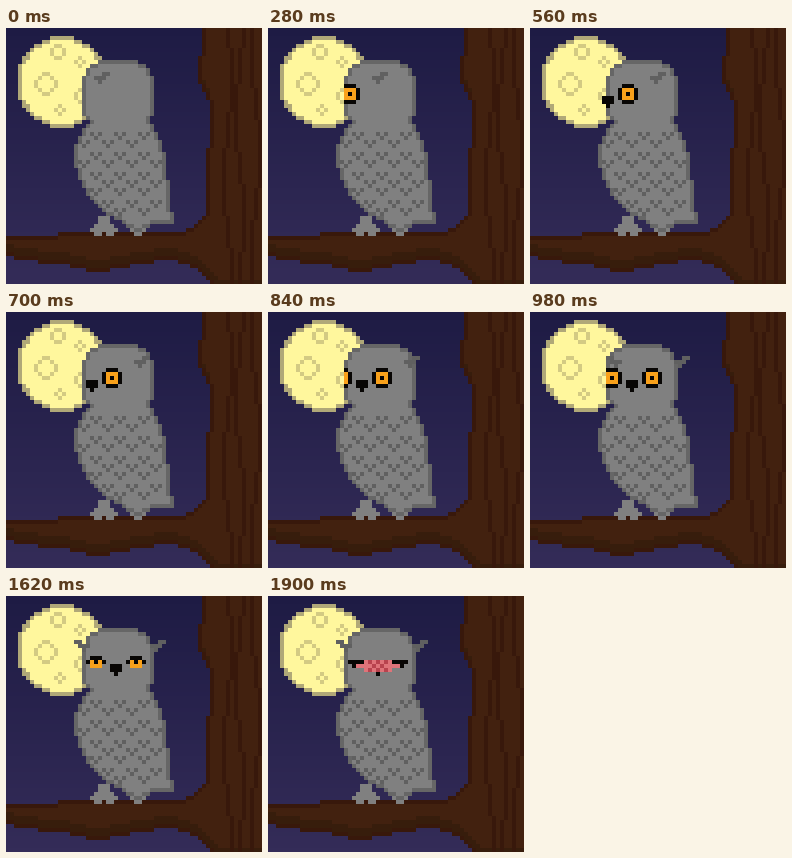
These frames come from a looping animation (256 by 256 pixels, 2900 ms). An HTML page with a canvas:

```html
<!DOCTYPE html>
<html lang="en">
<head>
<meta charset="utf-8">
<title>Night owl</title>
<style>
html, body { margin: 0; width: 100%; height: 100%; overflow: hidden; background: #25214f; }
canvas { display: block; width: 100vw; height: 100vh; image-rendering: pixelated; }
</style>
</head>
<body>
<canvas id="stage" width="64" height="64"></canvas>
<script>
const SIZE = 64, LOOP = 2900, STEP = 70, BLINK = 1620;
const ctx = document.getElementById('stage').getContext('2d');
const BARK = '#42210f', BARK_DARK = '#38180b', BARK_SHADE = '#371d0c';
const INK = { B: '#080604', O: '#f9a11b', G: '#808080', D: '#606060' };

const owlShape = new Path2D(`M23.5 8 H32.5 Q37 10 37 14 V20 Q37 22 35.5 23.5 Q39 26 40 34
  L41 43 L41.6 47 V49.4 H36 L33 51 L25 46.5 Q17 40 17 31 Q18 26 21 24 Q19 22 19 20 V14 Q19 10 23.5 8Z`);
const treeShape = new Path2D(`M49 -2 V6 L48 8 V13 L51 19 V29 L50 32 V44 Q50 50 42 51 H13 V52 H-2
  V57 H0 L4 58 L13 59 L20 60 L21 61 H25 L27 60 L34 59 L39 58 Q48 58 53 66 H66 V-2Z`);

function box(color, x, y, w = 1, h = 1) {
  ctx.fillStyle = color;
  ctx.fillRect(x, y, w, h);
}

function eachCell(visit) {
  for (let y = 0; y < SIZE; y++) for (let x = 0; x < SIZE; x++) visit(x, y);
}

const inside = (shape, x, y) => ctx.isPointInPath(shape, x + 0.5, y + 0.5);
const onRim = (shape, x, y) =>
  [[1, 0], [-1, 0], [0, 1], [0, -1]].some(([i, j]) => !inside(shape, x + i, y + j));

// Small sprite from text rows; blanks stay clear, cells left of minX are hidden.
function sprite(rows, x, y, minX = 0) {
  rows.forEach((row, j) => [...row].forEach((c, i) => {
    if (INK[c] && x + i >= minX) box(INK[c], x + i, y + j);
  }));
}

// Disc of cells around (cx, cy), hollow when an inner radius is given.
function disc(color, cx, cy, r, inner = -1) {
  eachCell((x, y) => {
    const d = Math.hypot(x + 0.5 - cx, y + 0.5 - cy);
    if (d <= r && d > inner) box(color, x, y);
  });
}

function sky() {
  for (let y = 0; y < SIZE; y++) {
    const p = y / SIZE;
    box(`rgb(${30 + 22 * p},${27 + 17 * p},${68 + 20 * p})`, 0, y, SIZE);
  }
}

function moon() {
  disc('#b0a878', 14, 13.5, 11.4);
  disc('#fff79d', 14, 13.5, 10.4);
  const crater = (x, y, r) => disc('#d3ca83', x, y, r, r - 0.6);
  crater(13, 6, 1.6);
  crater(10, 14, 2.6);
  crater(18.5, 8.5, 1);
  crater(13.5, 20.5, 1);
  crater(19, 17, 1.6);
}

function tree() {
  eachCell((x, y) => {
    if (!inside(treeShape, x, y)) return;
    const shaded = !inside(treeShape, x, y + 3);
    box(onRim(treeShape, x, y) ? BARK_DARK : shaded ? BARK_SHADE : BARK, x, y);
  });
  for (let y = 0; y < SIZE; y++) {
    for (let k = 0; k < 3; k++) {
      box(BARK_DARK, 55 + Math.floor(k * 3.7) + Math.round(Math.sin(y / 8 + k * 2)), y);
    }
  }
}

function owl() {
  sprite(['  GGG', '  GGG', ' GGGGG', 'GGGGGGG', ' GG GG'], 21, 47);
  sprite(['GGGG', ' GG'], 31, 50);
  eachCell((x, y) => {
    if (inside(owlShape, x, y)) box(onRim(owlShape, x, y) ? '#666' : INK.G, x, y);
  });
  // Staggered feathers
  for (let row = 0; row < 9; row++) {
    const y = 26 + Math.round(row * 2.4);
    for (let x = 18 + (row % 2 ? 0 : 3); x < 40; x += 6) {
      if (inside(owlShape, x - 1, y + 1) && inside(owlShape, x + 3, y)) sprite(['D D', ' D '], x, y);
    }
  }
}

const openEye = [' BBB ', 'BOOOB', 'BOBOB', 'BOOOB', ' BBB '];
const lids = [
  ['', ' BBB ', 'BOBOB', ' OOO '],
  ['', '', 'BBBBB', ' OBO '],
  ['', '', 'BBBBB', ' BBB ']
];

function blush(width) {
  for (let y = 16; y < 19; y++) {
    const half = width - 2 * Math.abs(y - 17);
    for (let d = -half; d <= half; d++) {
      const red = Math.abs(d) < 3 && (d + y) % 2 === 0;
      box(red ? '#b8434e' : '#df7379', 27 + d, y);
    }
  }
}

// turn: 0 (back of head) to 16 (facing us); shut: 0 (eyes open) to 5 (asleep)
function face(turn, shut) {
  sprite(['  DD', 'DDD', ' D'], Math.min(22 + turn, 36), 11);
  if (turn > 13) sprite(['DD', ' DDD', '  D'], 33 - turn, 11);
  const eye = shut ? lids[Math.min(shut, 3) - 1] : openEye;
  sprite(eye, 4 + turn, 14, 19);
  sprite(eye, 14 + turn, 14, 19);
  if (turn > 6) sprite(['BBB', 'BBB', ' B'], 10 + turn, 17, 18);
  if (shut > 2) blush(shut);
}

let last = -1;
function tick(now) {
  const t = now % LOOP;
  const turn = Math.min(16, Math.floor(t / STEP));
  const shut = t < BLINK ? 0 : Math.min(5, 1 + Math.floor((t - BLINK) / STEP));
  if (turn + shut !== last) {
    last = turn + shut;
    sky();
    moon();
    tree();
    owl();
    face(turn, shut);
  }
  requestAnimationFrame(tick);
}
tick(0);
</script>
</body>
</html>
```
